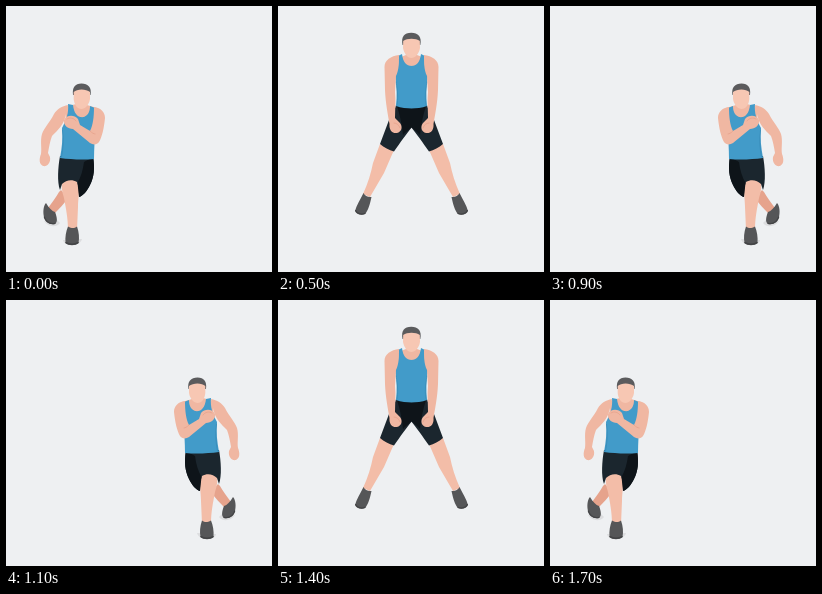
Write an HTML page with a canvas that moves like this. It is 266 px wide and 266 px high and loops after 1800 ms.

```html
<!DOCTYPE html>
<html lang="en">
<head>
<meta charset="utf-8">
<title>Side lunge</title>
<style>
  html, body { margin: 0; width: 100%; height: 100%; overflow: hidden; background: #eef0f2; }
  canvas { display: block; width: 100vmin; height: 100vmin; filter: blur(.6px); }
</style>
</head>
<body>
<canvas id="stage"></canvas>
<script>
const SIZE = 266, LOOP = 1800, AXIS = 133.5;
const canvas = document.getElementById('stage');
const ctx = canvas.getContext('2d');

const color = {
  skin: '#f0b7a2', leg: '#f3bda8', face: '#f7c7b3', shade: '#e6a38c',
  hair: '#5b5b5d', top: '#429bc9', topShade: '#368bb8',
  shorts: '#1b262e', fold: '#0e1419', shoe: '#555658', sole: '#434446',
  ground: '#dcdddf'
};

const shape = (fill, d) => ({ fill: color[fill], path: new Path2D(d) });
const line = (stroke, width, d) => ({ stroke: color[stroke], width, path: new Path2D(d) });

// Crossed step to the left; the right one is its mirror image.
const lunge = [
  // shadows under the shoes
  shape('ground', 'M38 215 C42 221 50 222 54 217 L50 213Z'),
  shape('ground', 'M57 234 C58 241 74 241 76 233Z'),
  // back leg
  shape('shade', 'M55 184 L62 192 C58 198 53 203 49 207 L42 202 C46 197 50 191 53 186Z'),
  shape('shoe', 'M40 197 C37 200 37 207 38 211 C39 216 44 219 49 218 C52 216 51 211 49 206 C46 205 43 202 40 197Z'),
  line('sole', 1.2, 'M38.3 211 C40 216 44 218.3 49 217.3'),
  // front leg and shorts
  shape('leg', 'M56 174 L73 174 C74 184 72 193 72 201 L71 224 L62 224 C62 212 60 203 58 192 C56 186 55 180 56 174Z'),
  shape('shorts', 'M54 150 L87 150 C89 162 88 171 84 179 C81 185 77 190 73 191 C73 186 73 181 71 176 C66 173 60 174 56 178 L54 184 C51 176 52 161 54 150Z'),
  shape('fold', 'M87 151 C89 162 88 171 84 179 C81 185 77 190 73 191 L71.5 177 C75 171 77 164 78 156Z'),
  shape('shoe', 'M62 220.5 C66 222.5 68 222.5 71 220.5 C73 226 73.5 232 72.5 237 C70 240 62 240 59.5 237 C59 231 60 225 62 220.5Z'),
  line('sole', 1.5, 'M60 236.7 C63 238.8 69 238.8 72 236.7'),
  // far arm
  shape('skin', 'M62 99 C56 100 51 103 48 108 C44 116 38 122 36 128 C34 135 36 142 35 148 C33 153 33 158 37 160 C41 161 45 157 44 151 L42 147 C43 141 44 135 46 130 C52 124 57 119 59 112Z'),
  // torso
  shape('skin', 'M70 94 H81 V99 L91 102 L87 116 H60 L59 101 L70 98Z'),
  shape('top', 'M62 98 L67 99 C68 108 72 112 78 111 C83 109 84 104 84 100 L89 102 C88 109 89 114 89 119 C89 132 88 143 88 153 C77 154 65 153.5 54 152 C56 141 57 132 56 122 C60 115 63 107 62 98Z'),
  line('topShade', .8, 'M56.5 124 C58 134 57 143 55.5 151'),
  // near arm with fist on the chest
  shape('skin', 'M88 101 C95 102 99 106 99 112 C98 122 96 131 93 136 C91 139 87 139 84 137 L67 123 C62 123 57 119 58 114 C60 109 68 108 72 113 L74 119 L84 125 C87 119 88 111 88 101Z'),
  line('shade', .8, 'M84 125 C86 127 88 128 89 128'),
  line('shade', .8, 'M61 113 C64 111 68 112 70 115'),
  // head
  shape('hair', 'M67 89 C66 81.5 69 77.5 75.5 77.5 C82 77.5 86 81.5 84.5 89Z'),
  shape('face', 'M67.7 86 C71 82.5 80 82.5 84 86 L84 93 C83 99 79 103 75.5 103 C71 103 68 98 67.7 93Z')
];

const half = [
  shape('leg', 'M102 138 L116 144 L106 167 L92 191 L85 188 C90 177 93 167 95 157Z'),
  shape('shoe', 'M85.5 187 C87 190 90 191.5 93.5 191 C92 198 90 205 87 208 C83 210 78 208 77 205 C78.5 199 82 194 85.5 187Z'),
  line('sole', 1.2, 'M77.6 204.5 C79 207.5 83 209 87 207.4'),
  shape('shorts', 'M118 99 H134 V121 C129 127 122 137 116 145.5 C111 144 106 141.5 102 138 C105 130 108 122 111 114 C114 109 117 104 118 99Z'),
  shape('fold', 'M119 100 H134 V121 C131 123 128 126 125 129 C124 119 122 109 119 100Z'),
  shape('top', 'M120 50 L124 48 C125 56 128 60 134 60 V102.5 C129 102.5 123 101.8 118 100 C119 90 119 80 117 70 C120 64 121 57 120 50Z'),
  line('topShade', .7, 'M118 76 C120 86 120 93 119 99')
];

const halfArm = [
  shape('skin', 'M121 49 C113 50 106.5 54 106.5 61 L107 84 C107.5 97 110 109 111.5 118 C111 124 114 127.5 119 127 C123.5 126 125 121 122 117 L117 112 C117 103 118 95 117 86 L118 70 C121 64 121 57 121 49Z'),
  line('shade', .8, 'M116 117 C119 117 121 119 122 122')
];

const neck = [
  shape('skin', 'M128 44 H139 V49 L147 52 L145 66 H122 L120 52 L128 49Z')
];

const head = [
  shape('hair', 'M124.5 39 C123 30.5 126 26.7 133.3 26.7 C140 26.7 144 30.5 142.3 39Z'),
  shape('face', 'M125.2 35 C129 32 138 32 141.8 35 L142 42 C141 48 137 52 133.5 52 C129 52 126 47 125 42Z')
];

function paint(parts) {
  for (const { fill, stroke, width, path } of parts) {
    if (fill) {
      ctx.fillStyle = fill;
      ctx.fill(path);
    } else {
      ctx.strokeStyle = stroke;
      ctx.lineWidth = width;
      ctx.stroke(path);
    }
  }
}

function paintMirrored(parts) {
  ctx.save();
  ctx.translate(2 * AXIS, 0);
  ctx.scale(-1, 1);
  paint(parts);
  ctx.restore();
}

function paintMiddle() {
  paint(neck);
  for (const parts of [half, halfArm]) {
    paint(parts);
    paintMirrored(parts);
  }
  paint(head);
}

function resize() {
  const side = Math.min(innerWidth, innerHeight) * devicePixelRatio;
  canvas.width = canvas.height = Math.round(side);
}

function frame() {
  const t = performance.now() % LOOP;
  const scale = canvas.width / SIZE;
  ctx.setTransform(scale, 0, 0, scale, 0, 0);
  ctx.lineCap = 'round';
  ctx.clearRect(0, 0, SIZE, SIZE);

  if (t < 300 || t >= 1500) paint(lunge);
  else if (t >= 600 && t < 1200) paintMirrored(lunge);
  else paintMiddle();

  requestAnimationFrame(frame);
}

addEventListener('resize', resize);
resize();
frame();
</script>
</body>
</html>
```
